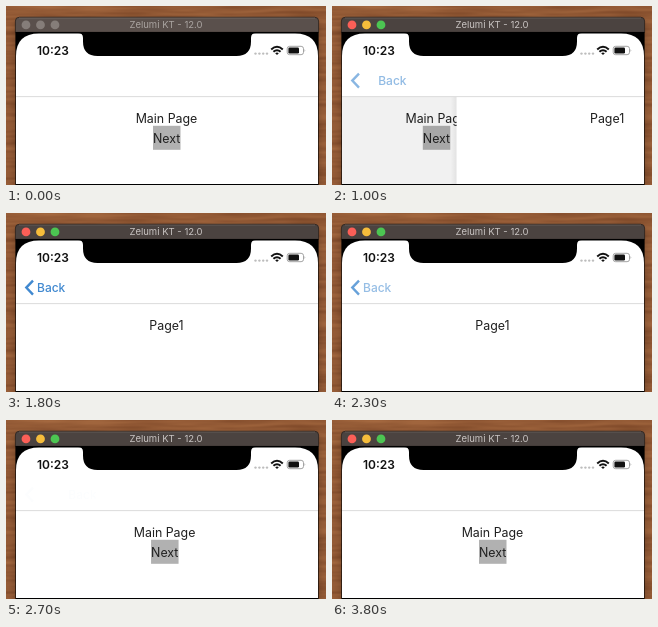
An HTML page for the animation above (3900 ms loop, 320 by 179 pixels).

```html
<!DOCTYPE html>
<html lang="en">
<head>
<meta charset="utf-8">
<title>Page navigation</title>
<style>
  html, body { margin: 0; width: 100%; height: 100%; overflow: hidden; background: #8f5a33; }
  svg { display: block; width: 100vw; height: 100vh; }
  text { font-family: Inter, Roboto, sans-serif; font-size: 12.4px; fill: #202020; }
  .mid { text-anchor: middle; }
  #bar { fill: #5a504c; stroke: #2a211d; stroke-width: .8; }
  #title { font-size: 9.5px; fill: #aaa4a1; }
  #lights circle { fill: #857d79; }
  .active #bar { fill: #4b4340; }
  .active #title { fill: #c9c4c2; }
  .active #lights circle:nth-child(1) { fill: #fb5f57; }
  .active #lights circle:nth-child(2) { fill: #f6bd3b; }
  .active #lights circle:nth-child(3) { fill: #4cc552; }
  #clock { font-weight: 600; font-size: 12px; fill: #111; }
  #label { font-size: 12px; font-weight: 500; fill: #4189d0; }
</style>
</head>
<body>
<svg viewBox="0 0 320 179" preserveAspectRatio="none">
  <defs>
    <filter id="grain" x="0" y="0" width="100%" height="100%" color-interpolation-filters="sRGB">
      <feTurbulence type="fractalNoise" baseFrequency=".018 .2" numOctaves="2" seed="8"/>
      <feColorMatrix values=".2 0 0 0 .48  .17 0 0 0 .27  .12 0 0 0 .15  0 0 0 0 1"/>
    </filter>
    <filter id="blur" x="-10%" y="-10%" width="120%" height="120%">
      <feGaussianBlur stdDeviation="4"/>
    </filter>
    <linearGradient id="edge">
      <stop offset="0" stop-color="#000" stop-opacity="0"/>
      <stop offset="1" stop-color="#000" stop-opacity=".1"/>
    </linearGradient>
    <clipPath id="view"><rect x="10" y="91" width="302" height="87"/></clipPath>
  </defs>

  <rect width="320" height="179" fill="#8f5a33" filter="url(#grain)"/>
  <rect x="9" y="15" width="304" height="180" opacity=".25" filter="url(#blur)"/>

  <g id="window">
    <path id="bar" d="M9.4 26.3V15q0-3.8 4-3.8H308.6q4 0 4 3.8V26.3z"/>
    <path d="M13 12H309" stroke="#fff" stroke-opacity=".16" stroke-width=".8"/>
    <rect x="9.4" y="26" width="303.2" height="153"/>
    <g id="lights">
      <circle cx="20" cy="18.9" r="4.4"/>
      <circle cx="34.5" cy="18.9" r="4.4"/>
      <circle cx="49" cy="18.9" r="4.4"/>
    </g>
    <text id="title" class="mid" x="160" y="22.4">Zelumi KT - 12.0</text>
  </g>

  <path d="M10 178V50Q10 27.5 33 27.5H289Q312 27.5 312 50V178z" fill="#fff"/>
  <path d="M72 27Q77 27 77 32V35.5Q77 50 91.5 50H230.5Q245 50 245 35.5V32Q245 27 250 27z"/>

  <text id="clock" x="31" y="49">10:23</text>
  <g fill="#bdbdbd">
    <circle cx="249.5" cy="47.6" r="1.2"/><circle cx="253.4" cy="47.6" r="1.2"/>
    <circle cx="257.2" cy="47.6" r="1.2"/><circle cx="261" cy="47.6" r="1.2"/>
  </g>
  <g fill="none" stroke="#111" stroke-width="2">
    <path d="M265.2 43.4Q271 38.2 276.8 43.4M267.4 45.8Q271 42.6 274.6 45.8"/>
    <path d="M269.2 47.2Q271 45.8 272.8 47.2L271 49z" fill="#111" stroke="none"/>
  </g>
  <rect x="281.2" y="40.3" width="16.3" height="8.4" rx="2.4" fill="none" stroke="#999" stroke-width=".9"/>
  <rect x="282.4" y="41.5" width="10.6" height="6" rx="1.2" fill="#111"/>
  <path d="M298.6 43Q300 44.5 298.6 46z" fill="#999"/>

  <path id="chevron" d="M27 67.6L20.3 74.6L27 81.6" fill="none" stroke="#4189d0" stroke-width="2.4"/>
  <text id="label" x="31" y="79">Back</text>

  <g clip-path="url(#view)">
    <g id="main">
      <text class="mid" x="160.5" y="117.4">Main Page</text>
      <rect x="147" y="119.8" width="27.5" height="24" fill="#b1b1b1"/>
      <text class="mid" x="160.7" y="136.5">Next</text>
    </g>
    <rect id="dim" x="10" y="91" width="302" height="87"/>
    <g id="page">
      <rect id="shade" x="4" y="91" width="6" height="87" fill="url(#edge)"/>
      <rect x="10" y="91" width="302" height="87" fill="#fff"/>
      <text class="mid" x="160.5" y="117.4">Page1</text>
    </g>
  </g>
  <path d="M10 90.6H312" stroke="#d8d8d8" stroke-width=".9"/>
</svg>
<script>
  const LOOP = 3900, STEP = 100, WIDTH = 302;
  const PUSH = 885, POP = 2385, PRESS = 2050;
  const $ = id => document.getElementById(id);
  const root = document.querySelector('svg');
  const clamp = v => Math.max(0, Math.min(1, v));
  const shift = (id, x) => $(id).setAttribute('transform', `translate(${x.toFixed(2)} 0)`);
  const fade = (id, v) => $(id).setAttribute('opacity', v.toFixed(3));

  // Critically damped spring, settled after half a second
  function spring(ms) {
    if (ms <= 0) return 0;
    if (ms >= 520) return 1;
    const x = ms * .01826;
    return 1 - (1 + x) * Math.exp(-x);
  }

  function draw(t) {
    const push = spring(t - PUSH), pop = spring(t - POP);
    const shown = push - pop;
    const press = clamp((t - PRESS) / 250);

    root.classList.toggle('active', t >= PUSH);
    shift('main', -.3 * WIDTH * shown);
    shift('page', WIDTH * (1 - shown) + (shown > 0 ? 0 : 10));
    fade('dim', .088 * push * (1 - pop) ** 4);
    fade('shade', shown);

    shift('label', 40 * (1 - push) + 32 * pop);
    fade('label', shown * (1 - .45 * press) * (.8 + .2 * push));
    fade('chevron', shown * (1 - .2 * press));
  }

  const start = performance.now();
  function tick() {
    const t = (performance.now() - start) % LOOP;
    draw(Math.floor(t / STEP) * STEP);
    requestAnimationFrame(tick);
  }
  draw(0);
  requestAnimationFrame(tick);
</script>
</body>
</html>
```
